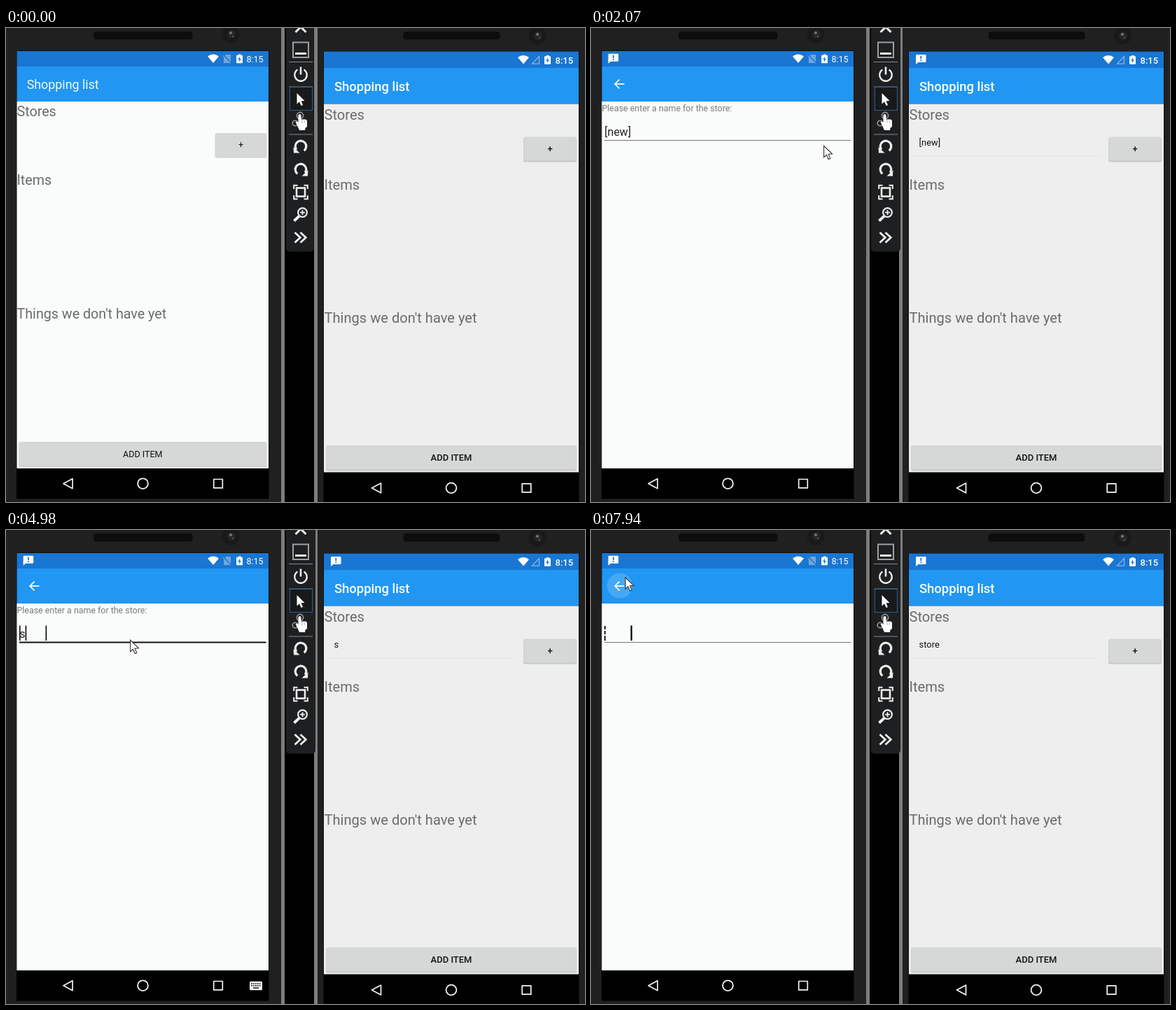
An HTML page with a canvas that plays this animation: 827 px wide and 677 px high, repeating every 8000 ms.

```html
<!DOCTYPE html>
<html lang="en">
<head>
<meta charset="utf-8">
<title>Shopping list</title>
<style>
html, body { margin: 0; width: 100%; height: 100%; overflow: hidden; background: #202020; }
canvas { display: block; width: 827px; height: 677px; }
</style>
</head>
<body>
<canvas id="stage"></canvas>
<script>
const W = 827, H = 677, LOOP = 8000;
const stage = document.getElementById('stage');
const dpr = window.devicePixelRatio || 1;
stage.width = W * dpr;
stage.height = H * dpr;
const c = stage.getContext('2d');

const clamp = v => Math.max(0, Math.min(1, v));
const mix = (a, b, k) => a + (b - a) * k;
const easeInOut = k => k * k * (3 - 2 * k);
const easeOut = k => 1 - (1 - k) * (1 - k);

function rect(x, y, w, h, fill) {
  c.fillStyle = fill;
  c.fillRect(x, y, w, h);
}
function round(x, y, w, h, r, fill) {
  c.beginPath();
  c.roundRect(x, y, w, h, r);
  c.fillStyle = fill;
  c.fill();
}
function dot(x, y, r, fill) {
  c.beginPath();
  c.arc(x, y, r, 0, 7);
  c.fillStyle = fill;
  c.fill();
}
function ring(x, y, r, color, width, from = 0, to = 7) {
  c.beginPath();
  c.arc(x, y, r, from, to);
  c.strokeStyle = color;
  c.lineWidth = width;
  c.stroke();
}
function trace(points, closed) {
  c.beginPath();
  points.forEach(([x, y], i) => i ? c.lineTo(x, y) : c.moveTo(x, y));
  if (closed) c.closePath();
}
function poly(points, fill) {
  trace(points, true);
  c.fillStyle = fill;
  c.fill();
}
function line(points, color, width, closed) {
  trace(points, closed);
  c.strokeStyle = color;
  c.lineWidth = width;
  c.stroke();
}
function text(str, x, y, size, color, weight = 400, align = 'left') {
  c.font = `${weight} ${size}px Roboto, sans-serif`;
  c.textAlign = align;
  c.fillStyle = color;
  c.fillText(str, x, y);
}
function at(x, y, draw) {
  c.save();
  c.translate(x, y);
  draw();
  c.restore();
}

function button(x, y, w, h, label, size, weight, down) {
  round(x - .5, y + 1, w + 1, h + 1, 2.5, 'rgba(0,0,0,.16)');
  round(x, y, w, h, 2, down ? '#c3c4c4' : '#d6d7d7');
  text(label, x + w / 2, y + h / 2 + size * .36, size, '#111', weight, 'center');
}

function shell(pillX, pillW, camX, camY) {
  round(pillX, 5, pillW, 11.5, 4, '#0d0d0d');
  dot(camX, camY, 12.5, '#191919');
  dot(camX + 1, camY, 6, '#262626');
  dot(camX, camY - 2, 2, '#777');
  dot(camX + 3, camY + 3, 1.2, '#555');
}

function wifi(x, y) {
  c.beginPath();
  c.moveTo(x, y + 12.5);
  c.lineTo(x - 8, y + 3);
  c.quadraticCurveTo(x, y - 3, x + 8, y + 3);
  c.closePath();
  c.fillStyle = '#fff';
  c.fill();
}
function battery(x, y) {
  rect(x + 3, y, 3.5, 2, '#fff');
  round(x, y + 1.3, 9, 11.5, 1, '#fff');
  poly([[x + 5.2, y + 3], [x + 2.2, y + 7.8], [x + 4.2, y + 7.8], [x + 3.8, y + 11.3], [x + 6.9, y + 6.4], [x + 4.9, y + 6.4]], '#1976d2');
}
function notice(x, y) {
  round(x, y, 14.5, 11, 1.2, '#fff');
  poly([[x, y + 8], [x + 4, y + 10.5], [x, y + 14]], '#fff');
  rect(x + 6.4, y + 1.8, 1.8, 4.4, '#1976d2');
  rect(x + 6.4, y + 7.4, 1.8, 1.8, '#1976d2');
}
function navIcons(back, home, recent, y) {
  c.lineJoin = 'round';
  line([[back + 7, y - 7], [back - 6, y], [back + 7, y + 7]], '#f4f4f4', 1.7, true);
  ring(home, y, 7.4, '#f4f4f4', 1.8);
  line([[recent - 6.3, y - 6.2], [recent + 6.3, y - 6.2], [recent + 6.3, y + 6.2], [recent - 6.3, y + 6.2]], '#f4f4f4', 1.7, true);
  c.lineJoin = 'miter';
}
function keyboard(x, y) {
  round(x, y, 18, 12.5, 1.5, '#f4f4f4');
  for (let r = 0; r < 2; r++)
    for (let k = 0; k < 5; k++) rect(x + 2.2 + k * 2.9, y + 2.4 + r * 2.9, 1.7, 1.7, '#222');
  rect(x + 5, y + 8.6, 8, 1.6, '#222');
}

function pointer(x, y) {
  at(x, y, () => {
    const shape = [[.6, .8], [.6, 17.2], [4.4, 13.7], [7.2, 20], [9.8, 18.9], [7.1, 12.7], [12.5, 12.3]];
    poly(shape, '#fff');
    line(shape, '#333', 1.1, true);
  });
}

function rotateIcon(y, flip) {
  at(421, y, () => {
    c.scale(flip, 1);
    ring(0, 0, 7.8, '#eee', 3.2, 2.5, 7.2);
    poly([[-10.5, 1], [-10, 9.5], [-1.5, 9.5]], '#eee');
  });
}

function hand() {
  ring(420, 125, 4.6, '#999', 1.6);
  ring(413, 136, 3.8, '#999', 1.6);
  round(417.5, 123, 4, 16, 2, '#fff');
  round(418, 130.5, 12, 12, 3, '#fff');
  poly([[413.5, 134], [416, 133.5], [419, 137], [428, 139], [427, 146], [419, 146]], '#fff');
  line([[422.8, 131], [422.8, 136]], '#999', .7);
  line([[426.4, 132], [426.4, 136]], '#999', .7);
}

function toolbar(wide) {
  const grey = '#7d7d7d', white = '#eee';
  rect(393, 0, 52, H, '#000');
  rect(393, 0, 5, H, grey);
  rect(440, 0, 5, H, grey);
  round(400, -8, wide ? 42 : 39.5, 327.5, 5, '#1e1f21');

  line([[413.5, -9], [428.5, 6]], white, 3);
  line([[428.5, -9], [413.5, 6]], white, 3);
  c.strokeStyle = '#a0a0a0';
  c.lineWidth = 2;
  c.strokeRect(410, 20.5, 22, 21.5);
  rect(413, 35, 16, 3, white);
  for (const y of [48, 151.5]) rect(404, y, 34, 1, '#888');
  rect(404, 83.5, 34, 1, '#777');

  ring(421, 67, 8.8, white, 2.4, -1.02, 4.16);
  rect(419.7, 55.5, 2.6, 11, white);

  rect(405, 85, 33, 33, '#17191b');
  c.strokeStyle = '#2f5f8a';
  c.lineWidth = 1;
  c.strokeRect(405.5, 84.5, 32, 33);
  poly([[415.5, 93], [415.5, 108.5], [419, 105.2], [421.6, 111], [424, 110], [421.6, 104.2], [426.5, 104]], '#fff');

  hand();
  rotateIcon(169, 1);
  rotateIcon(202, -1);

  c.strokeStyle = white;
  c.lineWidth = 2.6;
  c.strokeRect(415, 228.5, 12, 12);
  for (const sx of [-1, 1])
    for (const sy of [-1, 1])
      line([[421 + sx * 4.5, 234.5 + sy * 9.8], [421 + sx * 9.8, 234.5 + sy * 9.8], [421 + sx * 9.8, 234.5 + sy * 4.5]], white, 2);

  ring(423.5, 263.5, 6.4, white, 2.2);
  rect(420, 262.6, 7, 1.8, white);
  rect(422.6, 260, 1.8, 7, white);
  line([[418.8, 268.6], [411.5, 275.5]], white, 4);

  for (const x of [412.5, 420.5]) line([[x, 292], [x + 7.8, 299.3], [x, 306.6]], white, 2.8);
}

// Each entry: [start ms, value]
const noteText = [[0, ''], [1510, '[new]'], [3900, '[new'], [4040, '[ne'], [4120, '[n'], [4200, '['],
  [4360, ''], [4980, 's'], [5110, 'st'], [5710, 'sto'], [5790, 'stor'], [5870, 'store']];
const fieldText = [[0, '[new]'], [3810, '[new'], ...noteText.slice(3), [7940, '']];
const pick = (list, t) => list.reduce((v, [start, next]) => t >= start ? next : v, '');

// Pointer legs: start, end, from, to, easing
const legs = [
  [70, 850, [652, 672], [332, 177], easeOut],
  [940, 1090, [332, 177], [332, 167.5], easeInOut],
  [2200, 2530, [332, 167.5], [177, 156.5], easeInOut],
  [6370, 6930, [177, 156.5], [71.5, 86.5], easeInOut],
  [7020, 7370, [71.5, 86.5], [48.5, 67], easeOut]
];
function drawPointer(t) {
  const leg = legs.filter(l => t >= l[0]).pop();
  if (!leg) return;
  const [start, end, a, b, ease] = leg, k = ease(clamp((t - start) / (end - start)));
  pointer(mix(a[0], b[0], k), mix(a[1], b[1], k));
}

function listPage(t) {
  const grey = '#6b6b6b';
  text('Stores', 15.5, 126, 19.7, grey);
  text('Items', 15.5, 223.5, 19.7, grey);
  text("Things we don't have yet", 15.5, 415, 19.7, grey);
  button(299, 150, 73, 33.5, '+', 12.5, 400, t >= 1670);
  button(18.5, 591, 353.5, 34.5, 'ADD ITEM', 12.5, 400);
}

function caret(x, w = 1.7) {
  rect(x, 136.5, w, 21.5, '#111');
}

function namePage(t) {
  rect(15.5, 105, 359.5, 524, '#fafbfb');
  if (t < 7850) text('Please enter a name for the store:', 15.5, 118.5, 12.42, '#7b7b7b');
  const value = pick(fieldText, t);
  text(value, 19.3, 153.5, 16, '#222');
  const focused = t >= 2920 && t < 7510;
  if (focused) rect(19, 159.5, 352.5, 2, '#111');
  else rect(19, 160, 352.5, 1, '#777');
  if (t < 2920) return;

  if (t < 7940) caret(19.3 + c.measureText(value).width);
  caret(56.5, t >= 5870 ? 2.4 : 1.7);
  if (t >= 4360 && t < 7940) caret(19, 1.6);
  if (t >= 7940) for (const y of [137, 144, 151]) rect(19, y, 1.8, y === 151 ? 7 : 5, '#111');
  if (t >= 3340 && t < 4120) {
    dot(56.5, 170.8, 9, '#3c3c3c');
    poly([[56.5, 159.5], [49.8, 165.5], [63.2, 165.5]], '#3c3c3c');
  }
}

function leftPhone(t) {
  rect(0, 0, 393, H, '#202020');
  shell(125, 141.5, 321, 9);
  rect(15, 32.5, 360.5, 640, '#000');
  rect(15.5, 33, 359.5, 22, '#1976d2');
  rect(15.5, 55, 359.5, 50, '#2196f3');
  rect(15.5, 105, 359.5, 524, '#fafbfb');
  wifi(296, 37.5);
  poly([[311, 50], [311, 41], [314, 38], [321, 38], [321, 50]], '#6fa6de');
  line([[309.5, 38], [321.5, 50.5]], '#1976d2', 2.2);
  line([[309.5, 39.2], [320.5, 50.5]], '#8bb8e6', 1);
  battery(329, 37.5);
  text('8:15', 343.5, 49, 12.5, '#fff');
  if (t >= 1350) notice(24.7, 36.8);

  if (t < 1740) text('Shopping list', 29.7, 87, 17.85, '#f3f9ff');
  else {
    if (t >= 7760) dot(41, 79.5, 18, `rgba(255,255,255,${.17 * clamp((t - 7700) / 200)})`);
    line([[47.5, 80], [35, 80]], '#fff', 1.7);
    line([[40.6, 73.6], [34.2, 80], [40.6, 86.4]], '#fff', 1.7);
  }

  const shown = easeOut(clamp((t - 1890) / 180));
  if (shown < 1) listPage(t);
  if (shown > 0) {
    c.save();
    c.beginPath();
    c.rect(15.5, 105, 359.5, 524);
    c.clip();
    c.globalAlpha = shown;
    c.translate(0, 40 * (1 - shown));
    namePage(t);
    c.restore();
  }
  rect(15.5, 629, 359.5, 43, '#000');
  navIcons(88, 195.5, 303, 650.7);
  if (t >= 2920 && t < 7590) keyboard(348, 644.7);
}

function rightPhone(t) {
  const grey = '#6b6b6b';
  rect(445, 0, 382, H, '#202020');
  shell(567.5, 138, 759, 11);
  rect(453.5, 33, 365, 644, '#000');
  rect(454, 33.5, 364, 23.5, '#1976d2');
  rect(454, 57, 364, 51.5, '#2196f3');
  rect(454, 108.5, 364, 526, '#eee');
  wifi(739, 39);
  line([[751.5, 51.2], [761.5, 51.2], [761.5, 40.5]], '#8bb8e6', 1.2, true);
  battery(769, 39);
  text('8:15', 784.5, 50.5, 13, '#fff', 500);
  if (t >= 1350) notice(464, 38);
  text('Shopping list', 469, 90, 18.4, '#fff', 500);

  text('Stores', 454.5, 130.5, 20.1, grey);
  text('Items', 454.5, 230.5, 20.1, grey);
  text("Things we don't have yet", 454.5, 421, 20.1, grey);
  if (t >= 1510) {
    text(pick(noteText, t), 468.6, 167.5, 12.9, '#111');
    rect(454, 182, 275, 1, '#e7e7e7');
  }
  button(739.5, 155.5, 75, 34, '+', 13, 500);
  button(457.5, 596, 357, 34.5, 'ADD ITEM', 13, 500);
  navIcons(528.5, 636, 743.5, 657);
}

function draw(t) {
  c.setTransform(dpr, 0, 0, dpr, 0, 0);
  leftPhone(t);
  rightPhone(t);
  toolbar(t >= 940);
  drawPointer(t);
}

const began = performance.now();
function tick() {
  draw((performance.now() - began) % LOOP);
  requestAnimationFrame(tick);
}
tick();
</script>
</body>
</html>
```
